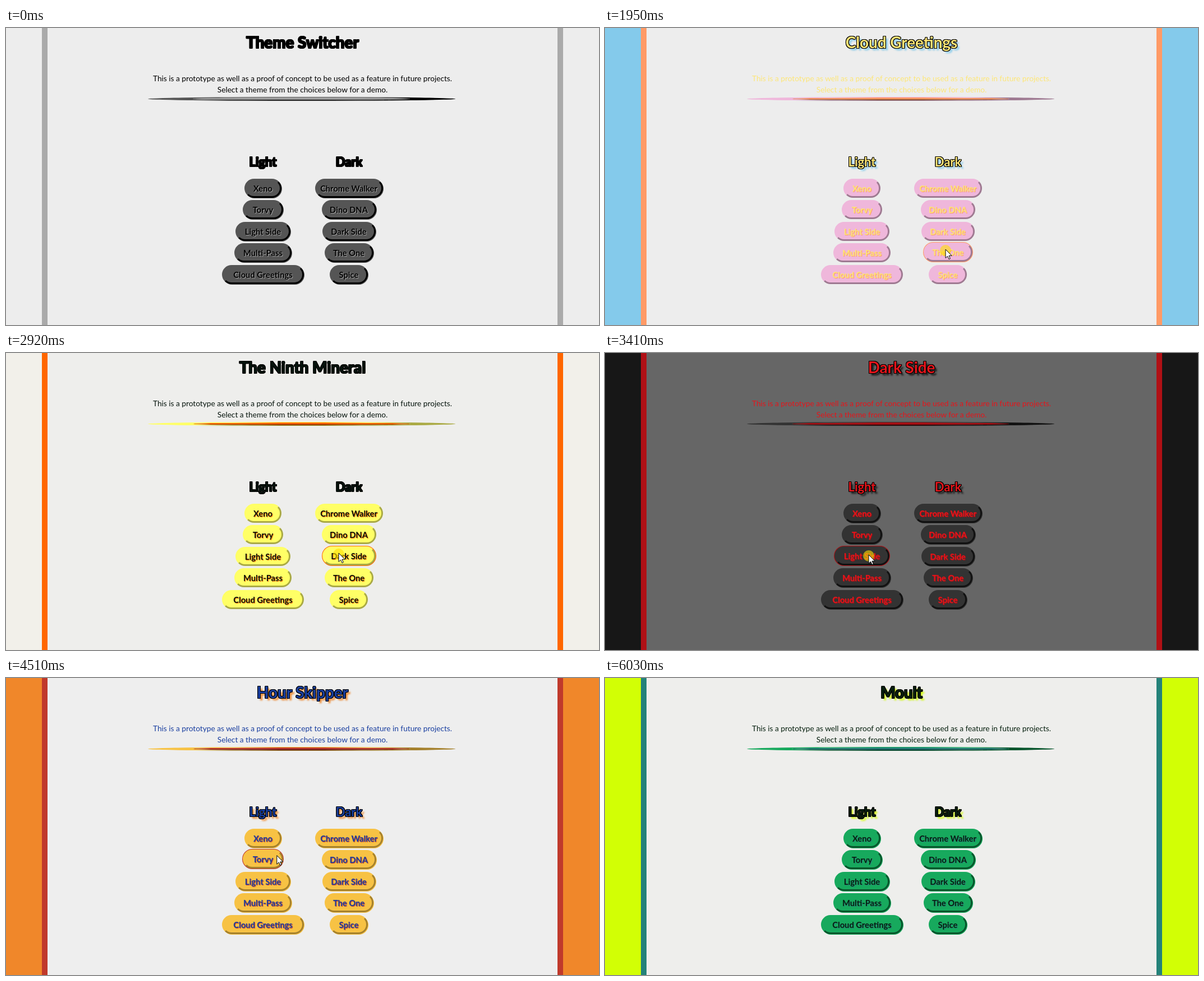
These frames come from a looping animation (1057 by 530 pixels, 6430 ms). An HTML page:

```html
<!DOCTYPE html>
<html lang="en">
<head>
<meta charset="utf-8">
<title>Theme Switcher</title>
<style>
  html, body { margin: 0; width: 100%; height: 100%; overflow: hidden; }
  body { position: relative; background: var(--side); color: var(--text); font-family: Lato, "Open Sans", sans-serif; }
  main { position: absolute; left: 64px; top: 0; width: 909px; height: 530px; border: solid var(--bar); border-width: 0 10px; background: var(--page); }
  h1, h2, p, hr, button, svg { position: absolute; margin: 0; white-space: nowrap; }
  h1, h2 {
    transform: translateX(-50%);
    text-shadow: 1px 1px #000, -1px 1px #000, 1px -1px #000, -1px -1px #000,
      1px 0 #000, -1px 0 #000, 0 1px #000, 0 -1px #000, 4px 4px 3px var(--side);
  }
  h1 { left: 528.5px; top: 0; font-size: 27.8px; line-height: 51px; }
  h2 { top: 223px; font-size: 22px; line-height: 32px; }
  p { left: 0; width: 1057px; top: 80px; text-align: center; font-size: 13.7px; line-height: 19.5px; }
  hr, button { box-sizing: border-box; border: 3px solid; border-color: var(--btn) var(--dark) var(--dark) var(--btn); }
  hr {
    left: 253px; top: 122.5px; width: 548px; height: 7px; border-width: 1px 80px; border-radius: 50%;
    background: linear-gradient(var(--bar) 40%, color-mix(in srgb, var(--bar), #000 60%)) padding-box;
  }
  button {
    height: 34px; padding: 0; border-radius: 17px;
    background: var(--btn); color: inherit; box-shadow: 1px 1px var(--edge);
    font: 700 14.7px/28px Lato, "Open Sans", sans-serif; text-shadow: 1px 1px 1px var(--bar);
  }
  button.hover { transform: translateY(-1px); box-shadow: 0 0 0 1px var(--bar); }
  svg { left: 0; top: 0; overflow: visible; }
</style>
</head>
<body>
<main></main>
<h1></h1>
<p>This is a prototype as well as a proof of concept to be used as a feature in future projects.<br>Select a theme from the choices below for a demo.</p>
<hr>
<h2 style="left:458px">Light</h2>
<h2 style="left:611.5px">Dark</h2>
<svg id="pointer" width="1" height="1">
  <circle id="press" cy="2" r="10" fill="#ffe000" fill-opacity=".6"/>
  <path d="M0 0V15.5L3.6 12.2L6 17.6L8.4 16.5L6 11.3H11Z" fill="#fff" stroke="#000"/>
</svg>
<script>
const LOOP = 6430, ENTER = 70, EXIT = 6020, PRESS = 110, HEIGHT = 34;
const $ = selector => document.querySelector(selector);

const columns = [
  { x: 458, items: [['Xeno', 66], ['Torvy', 72], ['Light Side', 98], ['Multi-Pass', 102], ['Cloud Greetings', 146]] },
  { x: 611, items: [['Chrome Walker', 121], ['Dino DNA', 97], ['Dark Side', 95], ['The One', 87], ['Spice', 68]] },
];

// title, then the colours named in props
const props = ['side', 'bar', 'page', 'text', 'btn', 'dark', 'edge'];
const start = ['Theme Switcher', '#ededed', '#aaa', '#ededed', '#000', '#555', '#000', '#555'];

// One entry per click: time, pointer x and y, theme
const clicks = [
  [760, 598, 440, ['Loam', '#de8735', '#b3a090', '#666664', '#a8132b', '#f4bf6c', '#a37f48', '#f4bf6c']],
  [1380, 482, 438, ['Cloud Greetings', '#84caeb', '#ff9a66', '#ededed', '#fde677', '#efb7db', '#9f7a92', 'transparent']],
  [2020, 607, 395, ['The Lattice', '#0b140c', '#1fae3c', '#666', '#3cf45a', '#1d4a26', '#08200d', '#1d4a26']],
  [2500, 472, 399, ['The Ninth Mineral', '#f2f0ea', '#ff6600', '#eeeeec', '#06140d', '#ffff66', '#aaaa44', 'transparent']],
  [2990, 593, 357, ['Dark Side', '#171717', '#b01015', '#666', '#e5151b', '#333', '#111', '#333']],
  [3440, 470, 360, ['Light Side', '#8ab9d8', '#c8a165', '#eee', '#1d4f91', '#9fd4ef', '#6a8d9f', 'transparent']],
  [3850, 581, 325, ['Fernosaur Bay', '#4a4520', '#66d94a', '#666', '#f5181c', '#2e8b57', '#08361f', 'transparent']],
  [4380, 463, 322, ['Hour Skipper', '#f0872a', '#c0392b', '#eee', '#1a3fa0', '#f7c244', '#a5812d', '#f7c244']],
  [4890, 594, 287, ['Chrome Walker', '#d68f00', '#ff69d2', '#666', '#881b99', '#efc990', '#9f8660', '#efc990']],
  [5310, 462, 286, ['Moult', '#d2ff05', '#24827a', '#eeeeec', '#07200f', '#17a95d', '#07552c', '#17a95d']],
];

// Pointer stops: time, x, y
const stops = [[ENTER, 985, 527], [500, 548, 452]];
for (const [time, x, y] of clicks) stops.push([time - PRESS - 20, x, y], [time + 50, x, y]);
stops.push([EXIT, 996, 534]);

const buttons = columns.flatMap(({ x, items }) => items.map(([label, width], row) => {
  const node = document.createElement('button');
  const left = x - width / 2, top = 269 + row * 38.4;
  node.textContent = label;
  node.style.cssText = `left:${left}px;top:${top}px;width:${width}px`;
  document.body.insertBefore(node, $('#pointer'));
  return { node, left, top, width };
}));

const ease = u => u * u * (3 - 2 * u);

function pointerAt(t) {
  const next = stops.findIndex(stop => stop[0] > t);
  if (next < 1) return null;
  const [t0, x0, y0] = stops[next - 1], [t1, x1, y1] = stops[next];
  const u = (t - t0) / (t1 - t0);
  const k = next === stops.length - 1 ? u : ease(u);
  return [x0 + (x1 - x0) * k, y0 + (y1 - y0) * k];
}

let current;
function applyTheme(theme) {
  if (theme === current) return;
  current = theme;
  $('h1').textContent = theme[0];
  props.forEach((name, i) => document.body.style.setProperty('--' + name, theme[i + 1]));
}

function draw(now) {
  const t = now % LOOP;
  const last = clicks.filter(click => click[0] <= t).pop();
  applyTheme(last ? last[3] : start);

  const pos = pointerAt(t);
  const [x, y] = pos || [-99, -99];
  $('#pointer').style.display = pos ? '' : 'none';
  $('#pointer').style.transform = `translate(${x}px, ${y}px)`;
  $('#press').style.display = clicks.some(([time]) => t >= time - PRESS && t < time) ? '' : 'none';
  for (const { node, left, top, width } of buttons) {
    node.classList.toggle('hover', x > left && x < left + width && y > top && y < top + HEIGHT);
  }
  requestAnimationFrame(draw);
}
draw(0);
</script>
</body>
</html>
```
